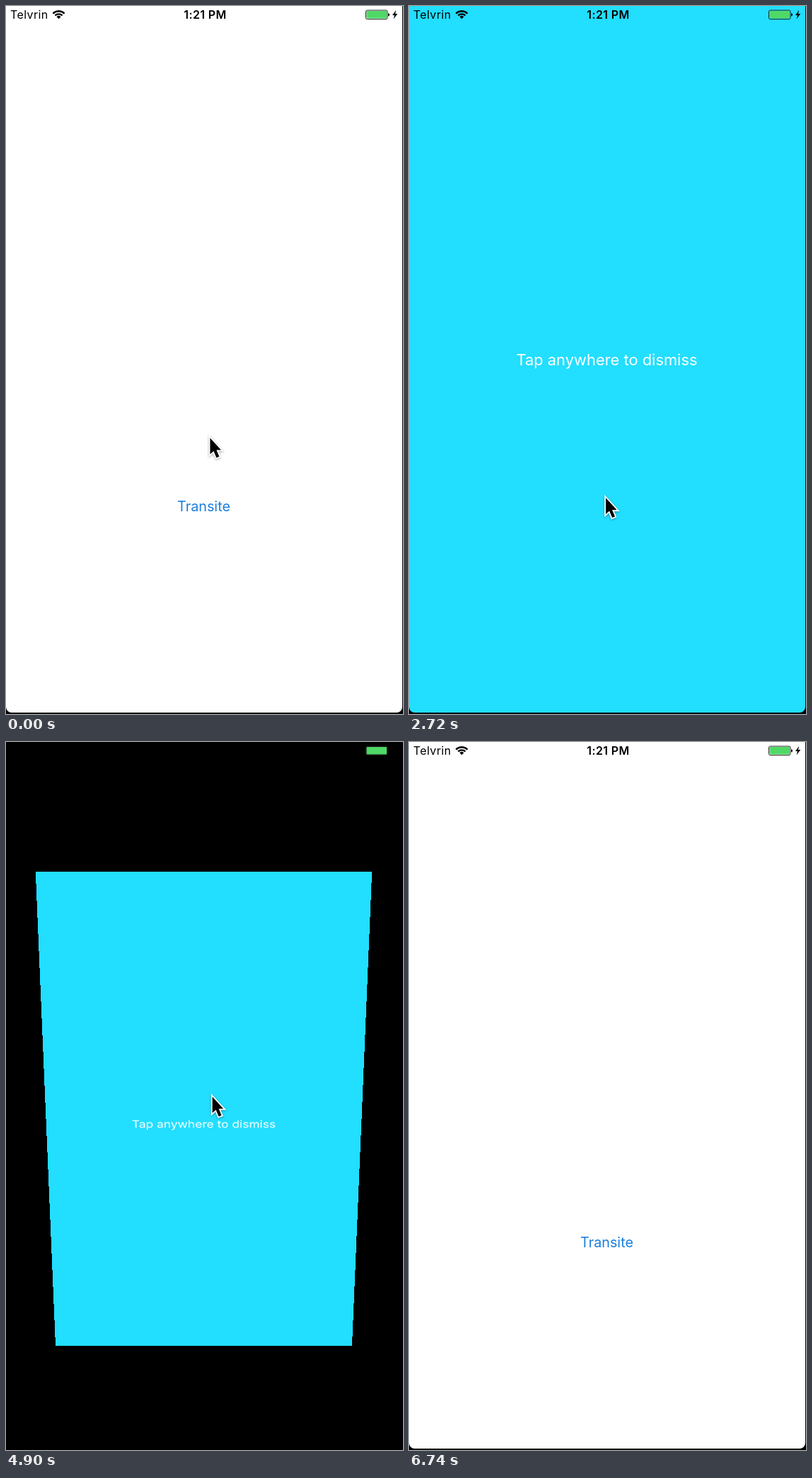
These frames come from a looping animation (561 px wide and 999 px high, 6.78 s). An HTML page:

```html
<!DOCTYPE html>
<html lang="en">
<head>
<meta charset="utf-8">
<title>Tilt and slide transition</title>
<style>
  html, body { margin: 0; width: 100%; height: 100%; overflow: hidden; background: #000; }
  body { position: relative; font-family: Inter, "Liberation Sans", sans-serif; }
  #phone {
    position: absolute; left: 0; top: 0; width: 560px; height: 997px;
    overflow: hidden; border-radius: 0 0 8px 8px; background: #000;
  }
  .page { position: absolute; left: -1px; top: 0; width: 561px; height: 997px; }
  .page span {
    position: absolute; left: 0; width: 100%; height: 30px; line-height: 30px;
    text-align: center; white-space: nowrap;
  }
  #home { background: #fff; }
  #home span { top: 690.5px; font-size: 19.8px; color: #1b7fdc; }
  #detail { background: #22deff; }
  #detail span { top: 483.5px; font-size: 21.9px; color: #fff; }
  #bar, #cursor { position: absolute; left: 0; top: 0; z-index: 3; overflow: visible; }
  #bar text { font-size: 16px; letter-spacing: .4px; }
  #cursor { filter: drop-shadow(0 1.5px 1.5px rgba(0, 0, 0, .35)); }
</style>
</head>
<body>
<div id="phone">
  <div class="page" id="home"><span id="button">Transite</span></div>
  <div class="page" id="detail"><span>Tap anywhere to dismiss</span></div>
  <svg id="bar" width="560" height="25">
    <text x="6" y="18">Telvrin</text>
    <g fill="none" stroke="#000" stroke-width="2.3">
      <path d="M66.4 10.6A11.5 11.5 0 0 1 82.6 10.6"/>
      <path d="M69.4 13.4A7.2 7.2 0 0 1 79.6 13.4"/>
    </g>
    <path d="M74.5 18.2L71.5 15.2A4.3 4.3 0 0 1 77.5 15.2Z"/>
    <text x="281.5" y="18" text-anchor="middle" font-weight="600">1:21 PM</text>
    <rect x="508.5" y="6" width="30.5" height="12.6" rx="2" fill="none" stroke="#222"/>
    <rect x="509.5" y="7" width="28.5" height="10.6" rx="1" fill="#4fd866"/>
    <path d="M540 10.2Q542 10.4 542 12.3T540 14.4Z"/>
    <path d="M551.2 5.8L546 13H549L547.6 18.6L553.2 11H550Z"/>
  </svg>
  <svg id="cursor" width="20" height="34">
    <path d="M0 0V23L5 18.4L9 28L13 26.3L9 17H15.6Z" stroke="#fff" stroke-width="3.6"
      paint-order="stroke"/>
  </svg>
</div>
<script>
  const LOOP = 6780, DURATION = 525, PRESENT = 1641, DISMISS = 4631;
  const $ = id => document.getElementById(id);
  const home = $("home"), detail = $("detail"), button = $("button"), cursor = $("cursor");
  const clamp = v => Math.min(1, Math.max(0, v));

  // cubic-bezier(.42, 0, .58, 1)
  function ease(x) {
    x = clamp(x);
    let lo = 0, hi = 1;
    for (let i = 0; i < 24; i++) {
      const s = (lo + hi) / 2, u = 1 - s;
      if (3 * u * u * s * .42 + 3 * u * s * s * .58 + s * s * s < x) lo = s; else hi = s;
    }
    return lo * lo * (3 - 2 * lo);
  }

  // tilt 0..1 leans the page back; shift moves it on screen, slide along its own plane
  function pose(page, tilt, shift, slide) {
    const sx = 1 - .2 * tilt;
    const sy = sx * (1 - .152 * (tilt + tilt * tilt) / 2);
    const depth = 1.275e-4 * tilt * (1.5 - .5 * tilt);
    page.style.transform = tilt
      ? `matrix3d(${sx},0,0,0,0,${sy},0,${depth.toFixed(9)},0,0,1,0,0,${shift},0,1) translateY(${slide}px)`
      : "none";
  }

  function show(page, on, z) {
    page.style.visibility = on ? "visible" : "hidden";
    page.style.zIndex = z;
  }

  function transit(from, to, dir, x) {
    const y = ease(x);
    const lean = clamp(2 * y), move = clamp(2 * y - 1);
    show(from, x < 1, 1);
    show(to, x > 0, 2);
    pose(from, lean, 0, dir * 1212 * move);
    pose(to, 1 - move, -dir * 1070 * (1 - move), 0);
  }

  // time, x, y of the pointer tip
  const path = [
    [20, 288.4, 609.5], [320, 268, 721], [480, 268, 721], [860, 277.5, 702.5],
    [2600, 277.5, 702.5], [3440, 291.6, 500.5], [5260, 291.6, 500.5], [5850, 463, 469]
  ];

  function pointer(t) {
    let i = 0;
    while (i < path.length - 2 && t > path[i + 1][0]) i++;
    const [t0, x0, y0] = path[i], [t1, x1, y1] = path[i + 1];
    const k = ease((t - t0) / (t1 - t0));
    cursor.style.transform = `translate(${x0 + (x1 - x0) * k}px,${y0 + (y1 - y0) * k}px)`;
    cursor.style.visibility = t < 5860 ? "visible" : "hidden";
  }

  function draw() {
    const t = performance.now() % LOOP;
    if (t < 3400) transit(home, detail, -1, (t - PRESENT) / DURATION);
    else transit(detail, home, 1, (t - DISMISS) / DURATION);
    button.style.opacity = t > 1540 && t < 3400 ? .46 : 1;
    pointer(t);
    requestAnimationFrame(draw);
  }
  draw();
</script>
</body>
</html>
```
